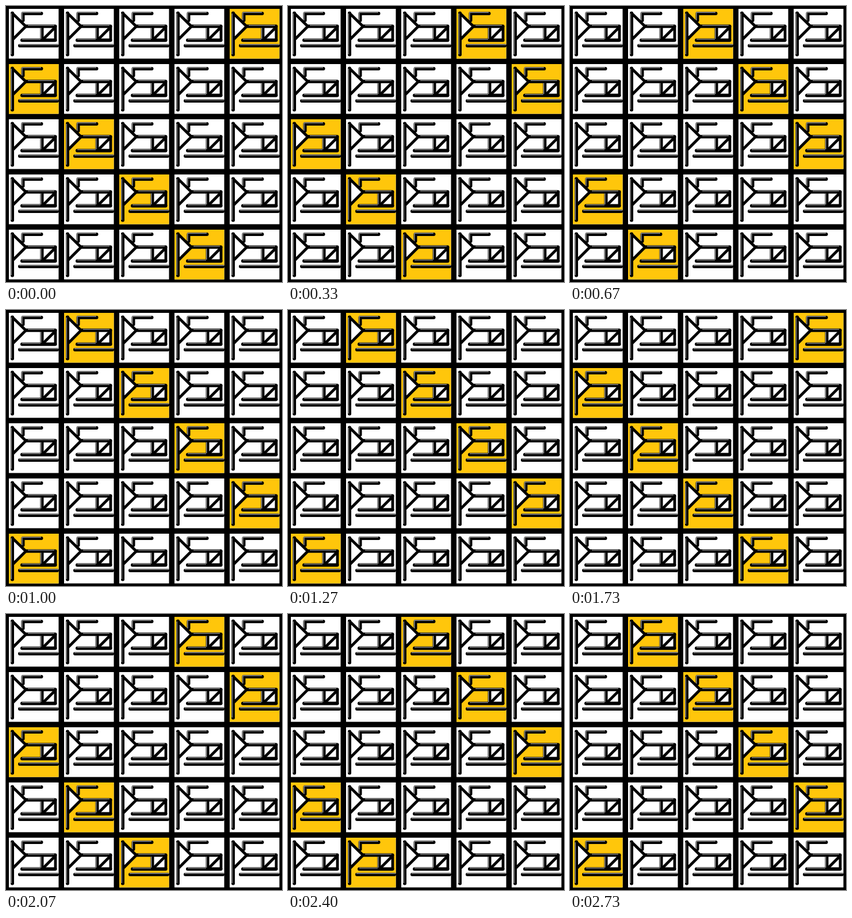
These frames come from a looping animation (480 by 480 pixels, 2990 ms). An HTML page:

```html
<!DOCTYPE html>
<html lang="en">
<head>
<meta charset="utf-8">
<title>Diagonal tiles</title>
<style>
  html, body { margin: 0; width: 100%; height: 100%; overflow: hidden; background: #000; }
  svg { display: block; width: 100%; height: 100%; }
  #tiles { fill: #fff; }
  #lit { fill: #ffc60b; animation: shift 2990ms step-end infinite; }
  .panes { fill: #fff; }
  .line { fill: none; stroke: #000; stroke-width: 6; stroke-linecap: round; stroke-linejoin: round; }
  .slant { stroke-width: 4.8; }
  .shine { fill: none; stroke: #999; stroke-width: 1.4; }
  /* One column to the left, about three times a second */
  @keyframes shift {
    0%     { transform: translateX(0); }
    11.03% { transform: translateX(-96px); }
    22.4%  { transform: translateX(-192px); }
    33.44% { transform: translateX(-288px); }
    44.48% { transform: translateX(-384px); }
    55.85% { transform: translateX(-480px); }
    66.88% { transform: translateX(-576px); }
    77.92% { transform: translateX(-672px); }
    89.29%, 100% { transform: translateX(-768px); }
  }
</style>
</head>
<body>
<svg viewBox="0 0 480 480">
  <defs>
    <rect id="tile" x="5" y="5" width="86.5" height="86.5"/>
    <g id="sign">
      <path class="panes" d="M11 12L34.5 35.5L11 58ZM62.5 35.5H86V59.5H62.5Z"/>
      <g class="line">
        <path d="M11 12.5V84.5M29.5 25V13H61.5M35 35.2H85.5M28 59.5H85.5M62.5 35.5V59.5M24 69H89"/>
        <path class="slant" d="M11 12.5L34.5 35.5L12 58M86 35.5V59.5M65 57.5L84 38.5"/>
      </g>
      <path class="shine" d="M9.3 13V84M27.9 25V11.3H61M38 33.6H84M60.7 38V57M28 57.9H60M23 67.3H91"/>
    </g>
  </defs>
  <g id="tiles"></g>
  <g id="lit"></g>
  <g id="signs"></g>
</svg>
<script>
  const SIZE = 5, PITCH = 96, STEPS = 9;

  function place(layer, shape, col, row) {
    const use = document.createElementNS("http://www.w3.org/2000/svg", "use");
    use.setAttribute("href", "#" + shape);
    use.setAttribute("x", col * PITCH);
    use.setAttribute("y", row * PITCH);
    document.getElementById(layer).append(use);
  }

  for (let row = 0; row < SIZE; row++) {
    for (let col = 0; col < SIZE + STEPS - 1; col++) {
      if (col < SIZE) {
        place("tiles", "tile", col, row);
        place("signs", "sign", col, row);
      }
      // Lit diagonals repeat every five columns
      if ((col - row + SIZE) % SIZE === SIZE - 1) place("lit", "tile", col, row);
    }
  }
</script>
</body>
</html>
```
